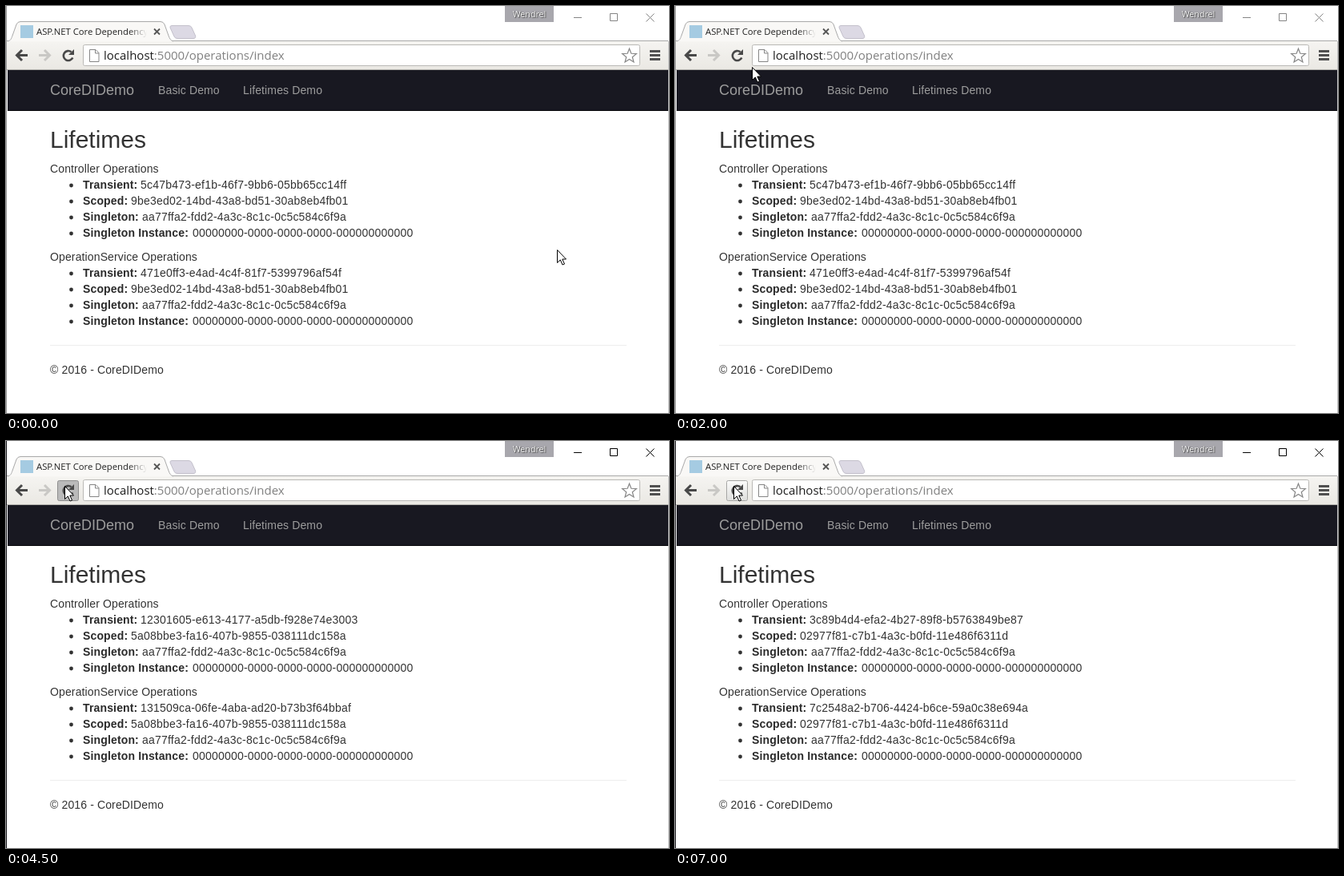
Recreate the animation shown at these times as an HTML page. Size 828 px wide and 508 px high, loop 8 s.

```html
<!DOCTYPE html>
<html lang="en">
<head>
<meta charset="utf-8">
<title>Lifetimes</title>
<style>
  html, body { margin: 0; width: 828px; height: 508px; overflow: hidden; background: #fff; }
  #stage { position: relative; width: 828px; height: 508px; overflow: hidden; --snap: 0px; }
  svg { position: absolute; left: 0; top: 0; }
  #stage span { position: absolute; white-space: pre; font: 14px/20px "Liberation Sans", Arial, sans-serif;
    color: #333; letter-spacing: calc(var(--snap) * .6); }
  #stage .id { letter-spacing: var(--snap); }
  #stage .bold { font-weight: bold; color: #2a2a2a; letter-spacing: calc(var(--snap) * .7); }
  #stage .head { font-size: 30px; line-height: 33px; letter-spacing: 0; }
  #stage .nav { color: #9d9d9d; }
  #stage .brand { font-size: 18px; color: #9d9d9d; letter-spacing: 0; }
  #stage .brand.on { color: #fff; }
  #stage .ui { font: 11.3px/15px "Open Sans", "Noto Sans", sans-serif; letter-spacing: 0; color: #222; }
  #stage .tab { width: 138px; overflow: hidden;
    -webkit-mask-image: linear-gradient(90deg, #000 84%, transparent); mask-image: linear-gradient(90deg, #000 84%, transparent); }
  #stage .url { font-size: 15px; line-height: 20px; color: #808080; }
  #stage .url b { font-weight: normal; color: #1c1c1c; }
  #stage .user { width: 61px; text-align: center; font-size: 10.7px; line-height: 14px; color: #fff;
    text-shadow: 0 0 1px #444, 1px 1px 1px #555; }
  #stage .tip { box-sizing: border-box; width: 99px; height: 18px; padding-left: 5px; line-height: 16px;
    border: 1px solid #767676; background: #fff; color: #333; box-shadow: 2px 2px 2px #0006; }
</style>
</head>
<body>
<div id="stage">
  <svg width="828" height="508">
    <defs>
      <linearGradient id="bar" x2="0" y2="1"><stop stop-color="#f5f4f1"/><stop offset="1" stop-color="#eae8e3"/></linearGradient>
      <linearGradient id="key" x2="0" y2="1"><stop stop-color="#fbfbfa"/><stop offset="1" stop-color="#dededc"/></linearGradient>
    </defs>

    <!-- window frame -->
    <rect x="623" width="61" height="20" fill="#a8a7ad"/>
    <g id="controls" fill="none">
      <path d="M709 14.5H719M754.5 9.5H763.5V18.5H754.5ZM799.5 9.5L809.5 19.5M809.5 9.5L799.5 19.5"/>
    </g>

    <!-- tab strip and toolbar -->
    <rect x="1" y="44" width="826" height="36" fill="url(#bar)"/>
    <path d="M1 43.5H827" stroke="#a9a9a9"/>
    <path d="M2 44C6 43 6.500 41 8 37L13 23Q14.500 19.500 18 19.500H193Q196.500 19.500 198 23L203 37C204.500 41 205.500 43 209 44" fill="#f9f8f6" stroke="#a9a9a9"/>
    <path d="M3 44.500H208" stroke="#f6f5f2"/>
    <path d="M207 24.500H228Q231 24.500 232 27L236.500 37Q237.500 40.500 234 40.500H214Q211 40.500 210 38L205 27Q204.500 24.500 207 24.500Z" fill="#dcd9e4" stroke="#c3c0cb"/>
    <rect id="icon" x="18" y="24" width="16" height="16" fill="#a5cbe2"/>
    <circle id="spin" cx="26" cy="32" r="6.500" fill="none" stroke="#8c8c8c" stroke-width="2" stroke-dasharray="29 12"/>
    <path d="M185 28.500L192 35.500M192 28.500L185 35.500" stroke="#555" stroke-width="1.800"/>
    <path d="M1 79.500H827" stroke="#b0afab"/>
    <rect id="button" x="64.500" y="49.500" width="26" height="25" rx="2"/>
    <rect x="96.500" y="48.500" width="695" height="26" rx="2" fill="#fff" stroke="#b9b8b5"/>
    <g fill="none" stroke="#484848" stroke-width="3">
      <path d="M27 61.500H14M20 55L13.500 61.500L20 68"/>
      <path d="M41 61.500H54M48 55L54.500 61.500L48 68" stroke="#c9c8c5"/>
      <path d="M83.300 64.500A6 6 0 1 1 81.500 57.300" stroke-width="2.600"/>
    </g>
    <path d="M85 54V61H78Z" fill="#484848"/>
    <path d="M104.500 54.500H112L116 58.500V69.500H104.500ZM111.500 54.500V59H116" fill="#fff" stroke="#858585"/>
    <path id="star" fill="#fff" stroke="#858585" stroke-width="1.200"/>
    <path d="M804 56.500H817M804 61.500H817M804 66.500H817" stroke="#505050" stroke-width="3"/>

    <!-- page -->
    <rect x="2" y="80" width="825" height="51" fill="#181821"/>
    <path d="M2 130.500H827" stroke="#08080c"/>
    <g id="dots" fill="#333"></g>
    <path d="M55 423.500H775" stroke="#eee"/>
    <path d="M827.500 44V508" stroke="#c6c6c6"/>
    <path id="edge" d="M.5 0V508"/>
  </svg>
</div>
<script>
const stage = document.getElementById('stage');
const el = id => document.getElementById(id);

function put(x, y, cls, text) {
  const s = document.createElement('span');
  s.className = cls;
  s.style.left = x + 'px';
  s.style.top = y + 'px';
  s.textContent = text;
  stage.append(s);
  return s;
}

function attrs(node, map) {
  for (const k in map) node.setAttribute(k, map[k]);
}

// Digits take whole pixels; other text follows in part.
const probe = put(0, -50, 'id', '0'.repeat(20));
stage.style.setProperty('--snap', 8 - probe.getBoundingClientRect().width / 20 + 'px');
probe.remove();

put(623, 3, 'ui user', 'Wendrel');
put(38, 24, 'ui tab', 'ASP.NET Core Dependency');
put(122, 51, 'ui url', '').innerHTML = '<b>localhost</b>:5000/operations/index';
const brand = put(55, 95, 'brand', 'CoreDIDemo');
put(190, 95, 'nav', 'Basic Demo');
put(296, 95, 'nav', 'Lifetimes Demo');
put(55, 150, 'head', 'Lifetimes');
put(55, 444, '', '© 2016 - CoreDIDemo');

const labels = [['Transient:', 168], ['Scoped:', 156], ['Singleton:', 170], ['Singleton Instance:', 233]];
const single = 'aa77ffa2-fdd2-4a3c-8c1c-0c5c584c6f9a';
const empty = '00000000-0000-0000-0000-000000000000';

function group(y, title) {
  put(55, y, '', title);
  return labels.map(([name, x], i) => {
    const top = y + 20 * (i + 1);
    put(96, top, 'bold', name);
    el('dots').innerHTML += `<circle cx="81.5" cy="${top + 11}" r="2.4"/>`;
    return put(x, top, 'id', '');
  });
}
const lists = [group(193, 'Controller Operations'), group(303, 'OperationService Operations')];

// first transient, second transient, scoped
const visits = [
  ['5c47b473-ef1b-46f7-9bb6-05bb65cc14ff', '471e0ff3-e4ad-4c4f-81f7-5399796af54f', '9be3ed02-14bd-43a8-bd51-30ab8eb4fb01'],
  ['12301605-e613-4177-a5db-f928e74e3003', '131509ca-06fe-4aba-ad20-b73b3f64bbaf', '5a08bbe3-fa16-407b-9855-038111dc158a'],
  ['7b795f00-b85c-42eb-83f2-82a9f422982e', '64b2f598-4ea8-46df-a738-edccac031ee9', '4172559e-1fd3-4e63-9463-4d4fcbd6ab75'],
  ['3c89b4d4-efa2-4b27-89f8-b5763849be87', '7c2548a2-b706-4424-b6ce-59a0c38e694a', '02977f81-c7b1-4a3c-b0fd-11e486f6311d']
];

const tip = put(73, 77, 'ui tip', 'Reload this page');

stage.insertAdjacentHTML('beforeend', `<svg width="828" height="508"><g id="cursor" fill="#fff" stroke="#000" stroke-linejoin="round">
  <path id="arrow" d="M.5 .5V16.500L4.300 12.900L7 19L9.500 18L6.800 12H11.500Z"/>
  <path id="hand" d="M-1.500 12V1.500Q0 -1 1.500 1.500V7Q3 5.500 4.500 7.500Q6 6 7.500 8Q9.500 7 10.500 9V14L8.500 20H0L-6 12.500Q-6 9.500 -3.500 10.500Z"/>
</g></svg>`);

el('star').setAttribute('d', 'M' + Array.from({ length: 10 }, (_, i) => {
  const a = i * Math.PI / 5, r = i % 2 ? 4 : 9.3;
  return `${778.5 + r * Math.sin(a)} ${62.5 - r * Math.cos(a)}`;
}).join('L') + 'Z');

// Pointer places, one per 100 ms from 800 ms on.
const path = [
  ...[.05, .16, .29, .43, .57, .7, .81, .9, 1].map(f => [688 - 484 * f, 304 - 154 * f]),
  [182, 136], [152, 118], [121, 98], [96, 76], [80, 62], [73, 56]
].map(p => p.map(Math.round));

// Times in steps of 100 ms.
const reloads = [
  { press: 28, text: 30, done: 31 },
  { press: 45, text: 47, done: 48 },
  { press: 66, text: 69, done: 70 }
];

function draw(n) {
  const [x, y] = n < 8 ? [688, 304] : path[Math.min(n - 8, path.length - 1)];
  const onBrand = n === 18 || n === 19;
  const active = n >= 27;
  const pressed = reloads.some(r => n === r.press);
  const loading = reloads.some(r => n > r.press && n < r.done);
  const over = n >= 21;

  el('cursor').setAttribute('transform', `translate(${x} ${y})`);
  el('arrow').style.display = onBrand ? 'none' : '';
  el('hand').style.display = onBrand ? '' : 'none';
  brand.classList.toggle('on', onBrand);

  attrs(el('controls'), { stroke: active ? '#000' : '#858585' });
  attrs(el('edge'), { stroke: active ? '#1b1b1f' : '#9a9a9a' });
  attrs(el('button'), {
    fill: !over ? 'none' : pressed ? '#bababa' : 'url(#key)',
    stroke: !over ? 'none' : pressed ? '#8e8e8e' : '#a6a6a4'
  });
  el('icon').style.display = loading ? 'none' : '';
  el('spin').style.display = loading ? '' : 'none';
  attrs(el('spin'), { transform: `rotate(${-n * 50} 26 32)` });
  tip.style.opacity = n === 26 ? .25 : n === 27 ? .5 : 0;

  const [a, b, scoped] = visits[reloads.filter(r => n >= r.text).length];
  [a, b].forEach((id, i) => [id, scoped, single, empty].forEach((s, j) => { lists[i][j].textContent = s; }));
}

const start = performance.now();
let last = -1;
function tick() {
  const n = Math.floor((performance.now() - start) % 8000 / 100);
  if (n !== last) draw(last = n);
  requestAnimationFrame(tick);
}
tick();
</script>
</body>
</html>
```
